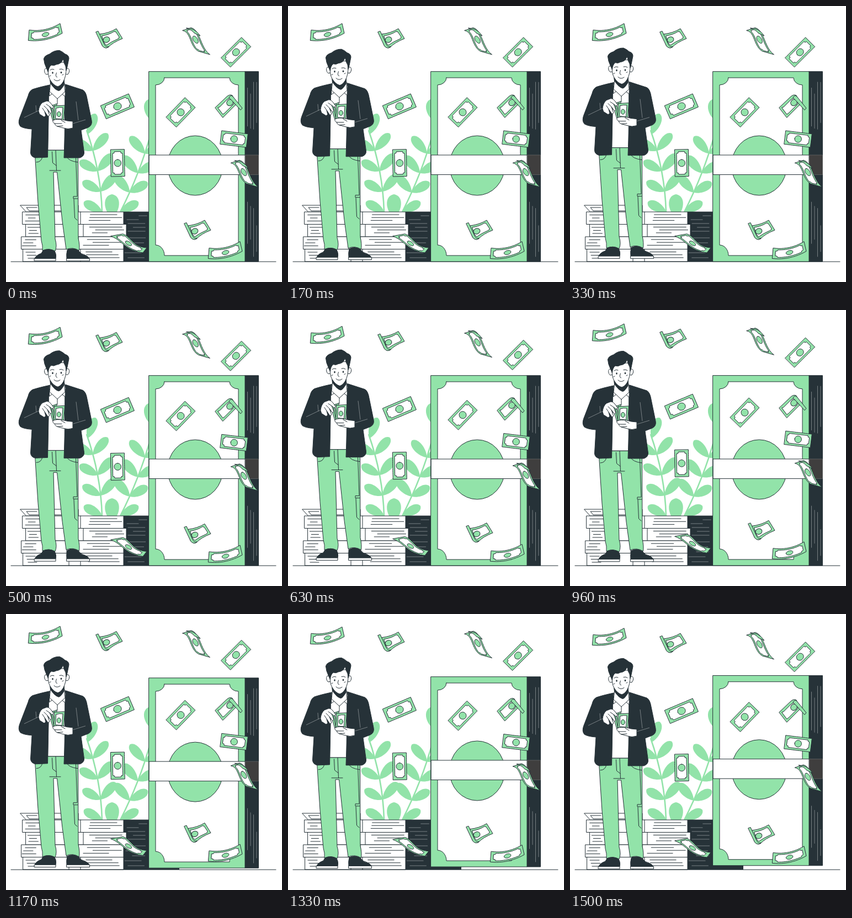
These frames come from a looping animation (500 px wide and 500 px high, 1.54 s). An HTML page:

```html
<!DOCTYPE html>
<html lang="en">
<head>
<meta charset="utf-8">
<title>Floating money</title>
<style>
html, body { margin: 0; width: 100%; height: 100%; overflow: hidden; background: #fff; }
svg { display: block; width: 100vw; height: 100vh; }
.g { fill: #92e3a9; }
.d { fill: #263238; }
.w { fill: #fff; }
.n { fill: none; }
.s { stroke: #263238; stroke-width: 1; stroke-linejoin: round; stroke-linecap: round; }
.l { fill: none; stroke: #fff; stroke-width: .7; opacity: .55; }
.stem { fill: none; stroke: #92e3a9; stroke-width: 2.6; }
.strap { fill: #3f3e3e; stroke: #6b6b6b; stroke-width: .7; }
</style>
</head>
<body>
<svg viewBox="0 0 500 500">
  <g id="back"></g>
  <g id="stack"></g>
  <g id="man"></g>
  <g id="bills"></g>
</svg>
<script>
const LOOP = 1540, PERIOD = 1500, RISE = 10, LEAD = 45;
const el = id => document.getElementById(id);

const path = (c, d) => `<path class="${c}" d="${d}"/>`;
const rect = (c, x, y, x2, y2) => path(c, `M${x} ${y}H${x2}V${y2}H${x}Z`);
const shape = (c, pts) => path(c, 'M' + pts.map(p => p.map(n => n.toFixed(1)).join(' ')).join('L') + 'Z');
const oval = (c, x, y, rx, ry, turn = 0) =>
  `<ellipse class="${c}" cx="${x}" cy="${y}" rx="${rx}" ry="${ry}" transform="rotate(${turn} ${x} ${y})"/>`;
const shift = (x, y, body) => `<g transform="translate(${x} ${y})">${body}</g>`;

let seed = 7;
const rnd = (a, b) => {
  seed = seed * 16807 % 2147483647;
  return a + (b - a) * seed / 2147483647;
};

// Teardrop leaf from its base, reaching by dx, dy
function leaf(x, y, dx, dy, w = 11.5) {
  const len = Math.hypot(dx, dy);
  const at = (k, side) => `${x + dx * k - dy / len * side * w} ${y + dy * k + dx / len * side * w}`;
  return path('g', `M${x} ${y}C${at(.25, .85)} ${at(.92, 1.15)} ${at(1, 0)}C${at(.92, -1.15)} ${at(.25, -.85)} ${x} ${y}Z`);
}

// Curved stem with a pair of leaves at each quarter; dir is the side the steep leaves take
function plant(x0, bend, x1, top, dir) {
  const base = 373, mid = (base + top) / 2;
  let out = path('stem', `M${x0} ${base}Q${bend} ${mid} ${x1} ${top}`);
  for (let i = 0; i < 4; i++) {
    const t = i / 4, q = 1 - t;
    const x = q * q * x0 + 2 * q * t * bend + t * t * x1;
    const y = base + (top - base) * t;
    out += leaf(x, y, -33 * dir, -18);
    if (i) out += leaf(x, y, 27 * dir, -31);
  }
  return out;
}

const plants = () =>
  plant(174, 172, 146, 225, 1) + leaf(148, 232, 14, -37) +
  plant(207, 243, 262, 232, -1) + leaf(262, 206, 0, -38, 16) +
  leaf(192, 384, 0, -43, 17);

// Paper edges: parallel lines of random length between a and b
function grain(c, a, b, from, to, step, upright) {
  let d = '';
  for (let p = from; p < to; p += step) {
    const len = (b - a) * rnd(.35, .85), start = rnd(a, b - len);
    d += upright ? `M${p} ${start}v${len}` : `M${start} ${p}h${len}`;
  }
  return path(c, d);
}

function bundle(x, x2, y, strap) {
  const low = y + 22.5;
  return rect('w s', x, y, x2, low) +
    path('n s', `M${strap - 21} ${y}V${low}M${strap} ${y}V${low}`) +
    grain('n s', x + 1, x + 32, y + 5.5, low - 2, 5.5) +
    grain('n s', strap + 4, x2 - 2, y + 5, low - 2, 5.2);
}

function piles() {
  return rect('d', 213, 372.5, 314, 463) +
    grain('l', 214, 258, 380, 410, 7) + grain('l', 214, 258, 420, 460, 9) +
    path('w s', 'M26 361H131V373H37Z') +
    path('n s', 'M56 365H37L42 371H131') +
    bundle(30, 213, 373, 135) + bundle(36, 218, 395.5, 140) +
    bundle(28, 213, 418, 131) + bundle(31, 213, 440.5, 135) +
    path('n s', 'M9 463.2H489');
}

function bigStack() {
  return rect('d s', 433, 118.7, 457.5, 463) +
    grain('l', 130, 235, 437.5, 456, 5.5, true) + grain('l', 340, 458, 437.5, 456, 5.5, true) +
    rect('g s', 259, 118.7, 433, 463) +
    path('w s', 'M287 130H405A16 13 0 0 0 421 143V433A16 19 0 0 0 405 452H287A16 19 0 0 0 271 433V143A16 13 0 0 0 287 130Z') +
    oval('g s', 342.7, 289, 50, 54) +
    rect('w s', 259.5, 270, 433, 305.5) +
    rect('strap', 433.5, 270, 457.5, 305.5);
}

function head() {
  return oval('w s', 73.5, 118.5, 3.7, 5.5, -12) + oval('w s', 111, 118.5, 3.5, 5.5, 12) +
    path('w s', 'M81 135L79 155L93 168L107 155L105 133Z') +
    path('d', 'M79 133Q93 146 106 132L105 144Q99 154 95 154Q88 152 80 140Z') +
    path('w s', 'M76 104Q75 127 80 134Q86 144 94 146Q102 143 106 132Q110 122 109 102Z') +
    path('d s', 'M68.5 96Q69 90 79 87Q87 80 97 80.5Q103 83 107 87Q114 89 114 95L111 110L109 117Q109 108 105 103Q105 99 103 96Q101 105 91 106Q87 109 82 107Q77 111 76.5 120L73 112Q69 104 68.5 96Z') +
    path('n s', 'M80 116Q83 113 87 115M97 114.5Q101 113 104 115.5M91.5 121Q88.500 128 92.5 129M87 133Q92 138 98 133.5M79 127l2 -1M102 125l2 -1') +
    oval('d', 84.5, 121, 1.3, 1.8) + oval('d', 100, 120.5, 1.3, 1.8);
}

function legs() {
  return path('g s', 'M52.5 270L55 310L58 356L64 425Q67 434 66 443Q78 438 89 444Q93 435 89 422L86 301H92.5L102 390L109 441Q121 436 132.5 443Q134 434 131 421L130.5 270L106 261H76Z') +
    path('n s', 'M79 298H99M90 261L91.5 298M83.5 264L84.5 284L91 289M55 283Q64 283 66 273M110 273Q113 281 130 283M126.5 274L129 345H122V349H130M123 350L124.5 384L129 388');
}

function shoes() {
  return path('d s', 'M52 458Q53 452 64 448L67 443Q78 438 88 444Q92 450 90 458Z') +
    rect('w s', 51.5, 457.5, 90, 461.8) +
    path('d s', 'M110 458Q109 449 111 442Q121 437 131 443Q136 450 143 451Q150 454 151 458Z') +
    rect('w s', 110, 457.5, 151.5, 461.8);
}

function torso() {
  return path('w s', 'M78 150H107L106 261H76Z') +
    path('d s', 'M79 143Q60 147 48 151Q42 154 40 163L25 202Q21 212 26 218Q32 222 47 223L44.5 266Q45 273 53 275L75.5 274L77 200V163Z') +
    path('d s', 'M108 142L139 152Q145 155 147 168L155 207Q157 216 149 220L136 225L141.5 265Q142 272 134 275H105L107 222V160Z') +
    path('w s', 'M81 141L78.5 149V163L93 152L107 164L108 148L105 137Q100 151 94 153Q86 150 81 141Z') +
    path('n s', 'M93 153V178') +
    path('l', 'M33 202L60 189M54 180L55 192M127 173L131 207M121 213L144 206');
}

function hands() {
  return path('g s', 'M78 184L86 179L89 206L85 207Z') +
    path('g s', 'M82 181L92 177L91 207L87 206Z') +
    path('w s', 'M85 183L89 180L89 201Z') +
    path('g s', 'M88 181L106.5 180L104.5 207L87 206Z') +
    path('w s', 'M91 185Q97 183 103 184L101.5 205L90 204Z') +
    oval('g s', 96, 196, 3.5, 4.5) +
    path('w s', 'M59 190Q60 180 66 175L74 172Q78 172 81 176L86 183L84 186L79 182L83 192L81 195L75 187L79 198L76 200L70 191L72 199L69 201L61 196Z') +
    path('n s', 'M73 178L79 182M69 181L75 187M66 185L70 191') +
    path('w s', 'M85 207Q92 204 103 206L111 208L121 209V221Q112 224 104 221L93 218Q87 215 89 213Q84 212 85 207Z') +
    path('n s', 'M89 213L101 213M93 218L103 217M100 207L107 211');
}

// Bill bent along the cubic a-b-c-e; its half width goes from w0 to w1
function bent([a, b, c, e], w0, w1 = w0, dot = 1) {
  const at = (u, v) => [0, 1].map(k => {
    const q = 1 - u;
    return q ** 3 * a[k] + 3 * q * q * u * b[k] + 3 * q * u * u * c[k] + u ** 3 * e[k] + v * (q * w0[k] + u * w1[k]);
  });
  const steps = [...Array(13).keys()].map(i => i / 12);
  // Half of an outline, then the same half turned round
  const ring = half => [...half, ...half.map(([u, v]) => [1 - u, -v])].map(p => at(...p));
  const outer = steps.map(u => [u, -1]);
  const inner = [[.08, -.45], [.13, -.5], ...steps.map(u => [.14 + .72 * u, -.72]), [.87, -.5], [.92, -.45]];
  const disc = steps.map(s => [.5 - .13 * dot * Math.cos(Math.PI * s), .5 * dot * -Math.sin(Math.PI * s)]);
  return shape('g s', ring(outer)) + shape('w s', ring(inner)) +
    shape('g s', disc.concat(disc.map(([u, v]) => [1 - u, -v])).map(([u, v]) => at(u, v)));
}

function flat(x, y, len, wid, deg) {
  const r = deg * Math.PI / 180, cos = Math.cos(r), sin = Math.sin(r);
  const line = [-.5, -1 / 6, 1 / 6, .5].map(k => [x + len * k * cos, y + len * k * sin]);
  return bent(line, [-sin * wid / 2, cos * wid / 2]);
}

const wave = bent([[41.5, 53], [62, 55.5], [82, 51], [100, 40.5]], [-.8, 9.5], [2, 8.8], .8);
const curl = bent([[328, 42], [344, 46], [342, 74], [359, 85]], [8, -2.5], [10.5, 3], .95) +
  path('g s', 'M327 40Q338 44 341 49L352 54Q341 39 327 40Z');
const drift = bent([[201, 415], [219, 421], [222, 440], [251.5, 442.5]], [-11, 2], [-3.5, 4.5], .9);

const fold = path('g s', 'M170 51Q187 49 200 41L211 59Q193 66 185 75Q179 78 174 71Z') +
  path('w s', 'M174 54Q187 52 196 46L199 47L205 56L204 59Q190 65 182 71L178 67Z') +
  oval('g s', 182, 61, 6, 5, -20) +
  path('g s', 'M163 47L167 45.5L178.5 70Q181 75 186 73.5Q181 79 175 73Z');

const roll = path('g s', 'M379 184L399 165Q405 159 410 162L418 177L393 202Z') +
  path('w s', 'M384 184L387 183L401 169L408 166L413 177L396 194L393 196Z') +
  oval('g s', 405.5, 175, 6, 5.5, -40) +
  path('g s', 'M404 166Q407 160 411 164L428 185L425 188.5L408 170Z');

el('back').innerHTML = plants() + piles();
el('stack').innerHTML = bigStack();
el('man').innerHTML = shift(0, .6, legs() + shoes() + torso() + head() + hands());
el('bills').innerHTML = wave + shift(326, 395, wave) + fold + shift(160, 347, fold) +
  curl + shift(87.5, 240, curl) + roll + drift +
  flat(416.7, 83.7, 52, 24, -45) + flat(202, 181.7, 55, 26, -23) +
  flat(316.5, 192.5, 49, 26, -46) + flat(413.2, 241, 47.5, 24.5, 7) +
  flat(202.3, 284.5, 48.5, 25, 89);

// Linear rise and fall that begins after a delay
function float(id, t, delay) {
  const u = Math.max(0, t + LEAD - delay) % PERIOD / PERIOD;
  const y = -RISE * (1 - Math.abs(2 * u - 1));
  el(id).setAttribute('transform', `translate(0 ${y.toFixed(3)})`);
}

function draw(t) {
  float('man', t, 0);
  float('bills', t, 500);
  float('stack', t, 1000);
}

let start;
function tick(now) {
  start ??= now;
  draw((now - start) % LOOP);
  requestAnimationFrame(tick);
}
draw(0);
requestAnimationFrame(tick);
</script>
</body>
</html>
```
